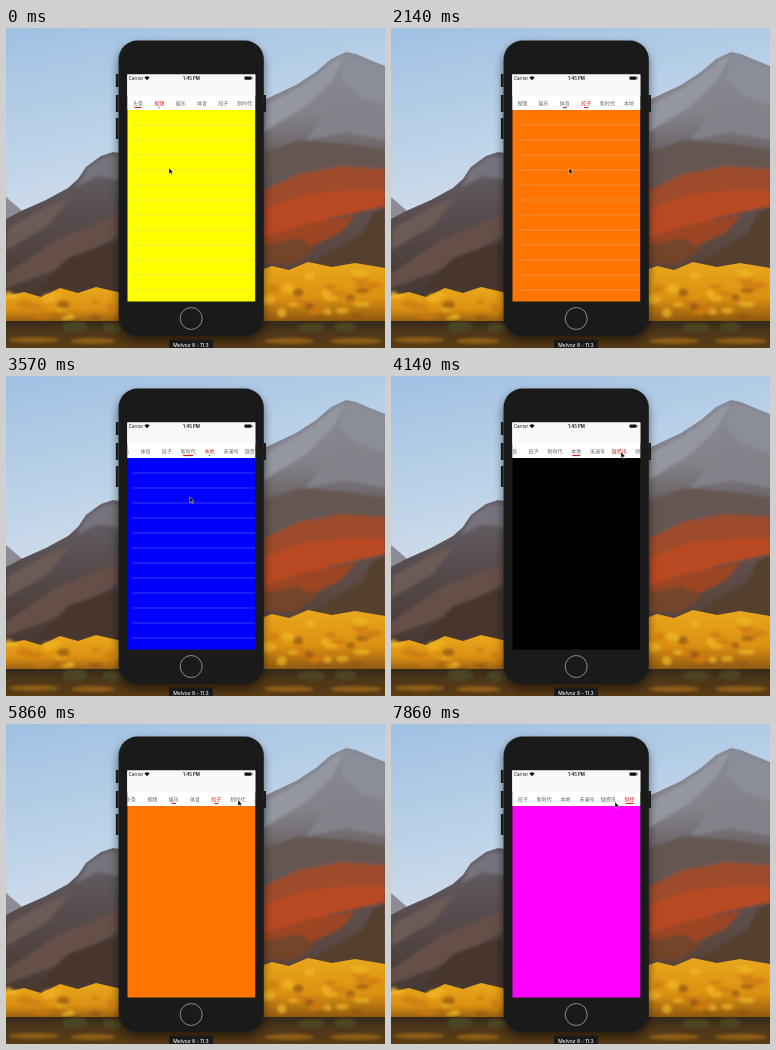
An HTML page for the animation above (8 s loop, 379x320 px).

```html
<!DOCTYPE html>
<html lang="zh">
<head>
<meta charset="utf-8">
<title>Tab pager</title>
<style>
html, body { margin: 0; width: 100%; height: 100%; overflow: hidden; background: #b9d0e4; }
svg { display: block; width: 100vw; height: 100vh; }
text { font-family: Inter, "Noto Sans CJK SC", "Noto Sans CJK", sans-serif; text-anchor: middle; }
#tabs text { font-family: "Noto Sans CJK SC", "Noto Sans CJK", sans-serif; font-size: 5px; }
</style>
</head>
<body>
<svg viewBox="0 0 379 320" preserveAspectRatio="none">
  <defs>
    <linearGradient id="sky" x1="0" y1="0" x2=".35" y2="1">
      <stop offset="0" stop-color="#9fc1e3"/><stop offset=".6" stop-color="#c2d5e9"/><stop offset="1" stop-color="#dce2ea"/>
    </linearGradient>
    <linearGradient id="rock" x1="0" y1="0" x2="0" y2="1">
      <stop offset="0" stop-color="#868a94"/><stop offset=".25" stop-color="#83828a"/>
      <stop offset=".45" stop-color="#645a5b"/><stop offset="1" stop-color="#553c33"/>
    </linearGradient>
    <linearGradient id="ridge" x1="0" y1="0" x2="0" y2="1">
      <stop offset="0" stop-color="#67626c"/><stop offset=".4" stop-color="#584e50"/><stop offset="1" stop-color="#46372f"/>
    </linearGradient>
    <linearGradient id="leaves" x1="0" y1="0" x2="0" y2="1">
      <stop offset="0" stop-color="#e9a81c"/><stop offset=".55" stop-color="#dc9012"/><stop offset="1" stop-color="#7c4b12"/>
    </linearGradient>
    <linearGradient id="water" x1="0" y1="0" x2="0" y2="1">
      <stop offset="0" stop-color="#33291a"/><stop offset=".4" stop-color="#4d3618"/><stop offset="1" stop-color="#5a3c15"/>
    </linearGradient>
    <filter id="soft"><feGaussianBlur stdDeviation="1.5"/></filter>
    <filter id="shade" x="-20%" y="-20%" width="140%" height="140%"><feGaussianBlur stdDeviation="5"/></filter>
    <clipPath id="screen"><rect x="121.3" y="46.5" width="128" height="227"/></clipPath>
  </defs>

  <g id="wallpaper">
    <rect width="379" height="220" fill="url(#sky)"/>
    <path d="M0 169L14 181L30 200H0Z" fill="#8d8c96"/>
    <path d="M0 191L15 183L40 172L62 160L72 151L80 139L95 128L107 124L120 126V275H0Z" fill="url(#ridge)"/>
    <path d="M240 80L260 71L290 57L310 44L325 31L340 24L350 26L364 32L379 38V270H240Z" fill="url(#rock)"/>
    <g filter="url(#soft)">
      <path d="M82 140L97 130L114 128V152L92 148L70 159Z" fill="#77737d"/>
      <path d="M2 200L42 178L64 170L42 198L0 222Z" fill="#6c5a54"/>
      <path d="M0 246L50 212L112 186V206L60 238L0 260Z" fill="#66504a"/>
      <path d="M62 230L112 212V262H30Z" fill="#46352f"/>
      <path d="M260 77L292 60L314 45L328 33L340 27L326 53L300 78L258 104Z" fill="#9496a0"/>
      <path d="M342 27L379 40V76L352 68L334 50Z" fill="#8b8e98"/>
      <path d="M330 70L352 72L379 84V112L340 104L300 112Z" fill="#83828a"/>
      <path d="M258 124L294 112L341 116L379 122V140L317 138L258 153Z" fill="#655751"/>
      <path d="M258 162L292 146L335 138L379 141V176L325 180L258 205Z" fill="#9d4c2c"/>
      <path d="M258 182L300 166L350 162L379 163V178L325 190L276 208L258 209Z" fill="#b94a22"/>
      <path d="M258 209L300 196L350 187L334 205L287 227L258 236Z" fill="#9c4522"/>
      <path d="M379 179L366 186L357 205L333 219L301 239H379Z" fill="#54402f"/>
      <path d="M258 217L291 210L311 220L290 236H258Z" fill="#74442a"/>
    </g>
    <path d="M0 268L18 264L35 269L54 260L72 265L90 259L120 266V299H0Z" fill="url(#leaves)"/>
    <path d="M250 244L266 238L283 242L302 234L326 239L349 235L379 240V299H250Z" fill="url(#leaves)"/>
    <g id="clumps" filter="url(#soft)"></g>
    <rect y="293" width="379" height="27" fill="url(#water)"/>
    <g filter="url(#soft)" fill="#8f5f18">
      <ellipse cx="28" cy="312" rx="25" ry="3"/><ellipse cx="87" cy="313" rx="22" ry="3"/>
      <ellipse cx="283" cy="313" rx="25" ry="3"/><ellipse cx="350" cy="313" rx="26" ry="3"/>
    </g>
    <g filter="url(#soft)" fill="#4c4420">
      <ellipse cx="69" cy="299" rx="13" ry="6"/><ellipse cx="106" cy="300" rx="10" ry="5"/>
      <ellipse cx="305" cy="300" rx="14" ry="5"/><ellipse cx="339" cy="299" rx="11" ry="5"/>
    </g>
  </g>

  <rect x="112" y="17" width="146" height="296" rx="20" opacity=".5" filter="url(#shade)"/>
  <path d="M111.2 46V59M111.2 67V84M111.2 90V111M258.7 67V84" stroke="#1a1a1b" stroke-width="2.6"/>
  <rect x="112.6" y="12.5" width="145.2" height="295.5" rx="19" fill="#1a1a1a"/>
  <circle cx="185.2" cy="290.5" r="11" fill="none" stroke="#8c8c8c" stroke-width="1"/>

  <g clip-path="url(#screen)">
    <g id="pages"></g>
    <rect x="121" y="46" width="129" height="36" fill="#fff"/>
    <rect x="121" y="46" width="129" height="22" fill="#f9f9f9"/>
    <g font-size="4.4" fill="#111">
      <text x="122.8" y="51.8" style="text-anchor:start">Carrier</text>
      <text x="185.5" y="51.8" font-weight="600">1:45 PM</text>
    </g>
    <path d="M138.4 49.5Q141 47.2 143.6 49.5L141 52.2Z" fill="#111"/>
    <rect x="238.5" y="48.5" width="7" height="3.2" rx=".8" fill="#111"/>
    <rect x="245.9" y="49.4" width=".7" height="1.4" fill="#111"/>
    <g id="tabs"></g>
  </g>

  <rect x="163" y="311.5" width="44" height="9" rx="1.5" fill="#1a1a1a"/>
  <text x="185" y="318.7" font-size="5" font-weight="500" fill="#f4f4f4">Melvoz 8 - 11.3</text>
  <path id="cursor" d="M0 0V6L1.4 4.8L2.3 6.8L3.3 6.3L2.4 4.4L4.2 4.3Z" fill="#000" stroke="#fff" stroke-width=".45"/>
</svg>
<script>
const LEFT = 121.3, WIDTH = 128, TAB = WIDTH / 6, FPS = 7, FRAMES = 56;
const RED = '#c62a20';
const labels = ['头条', '视频', '娱乐', '体育', '段子', '新时代', '本地', '禾澜号', '微资讯', '财经'];
const colors = ['#f00', '#ff0', '#0f0', '#800080', '#ff7500', '#7b7b7b', '#00f', '#0ff', '#000', '#f0f'];

// [step, tab, tapped]
const picks = [
  [-9, 0], [-.44, 1], [5, 2], [10, 3], [13.9, 4], [18.5, 5], [24.5, 6],
  [29, 8, 1], [32.5, 4, 1], [36.5, 2, 1], [40.37, 4, 1], [43.5, 6, 1], [47, 8, 1], [51, 9, 1]
];
// [step, x, y]
const pointer = [
  [0, 163, 140], [2, 229, 139], [4, 165, 140], [6.5, 229, 138], [7.4, 229, 138], [9, 168, 140],
  [11, 229, 139], [13, 178, 140], [15, 178, 140], [16, 226, 138], [17.6, 168, 139], [20, 225, 134],
  [22, 225, 134], [24, 166, 138], [27.6, 230, 76], [29.4, 230, 76], [32, 133, 76], [33, 133, 76],
  [36, 143, 76], [37, 143, 76], [39.8, 217, 76], [40.4, 219, 76], [41, 232, 76], [47.4, 229, 76],
  [50.5, 238, 76], [51.5, 238, 76], [55, 224, 78]
];

const byId = id => document.getElementById(id);
function add(parent, tag, attrs) {
  const el = document.createElementNS('http://www.w3.org/2000/svg', tag);
  for (const name in attrs) el.setAttribute(name, attrs[name]);
  return parent.appendChild(el);
}
const clamp = (v, lo, hi) => Math.min(hi, Math.max(lo, v));
const smooth = v => { v = clamp(v, 0, 1); return v * v * (3 - 2 * v); };
const mix = (a, b, p) => a + (b - a) * p;
const shift = i => clamp((i + .5) * TAB - WIDTH / 2, 0, labels.length * TAB - WIDTH);

let seed = 11;
const random = () => (seed = seed * 16807 % 2147483647) / 2147483647;
for (let i = 0; i < 44; i++) {
  const left = i % 3 === 0, depth = random();
  add(byId('clumps'), 'ellipse', {
    cx: left ? random() * 112 : 258 + random() * 121,
    cy: left ? 267 + depth * 23 : 243 + depth * 46,
    rx: 4 + random() * 5, ry: 2 + random() * 3,
    fill: ['#f0b824', '#cf7a13', '#8f5715'][i % 5 % 3], opacity: .7
  });
}

const pages = colors.map(fill => {
  const page = add(byId('pages'), 'g', {});
  add(page, 'rect', { x: LEFT, y: 82, width: WIDTH + .3, height: 192, fill });
  let d = '';
  for (let i = 1; i < 13; i++) d += `M${LEFT + 5.2} ${82 + i * 15}H${LEFT + WIDTH}`;
  const lines = add(page, 'path', { d, stroke: '#c8c7cc', 'stroke-width': .6, opacity: .5 });
  return { page, lines };
});

const tabs = labels.map((label, i) => {
  const x = LEFT + (i + .5) * TAB;
  const text = add(byId('tabs'), 'text', { x, y: 76.8 });
  text.textContent = label;
  const bar = add(byId('tabs'), 'rect', { y: 78.9, height: 1.2, fill: RED });
  return { text, bar, x, full: label.length * 4 };
});

function draw(step) {
  const at = picks.findLastIndex(pick => step >= pick[0]);
  const [start, tab, tapped] = picks[at];
  const from = at ? picks[at - 1][1] : 0;
  const next = picks[at + 1];
  const p = smooth((step - start) / 2.1);
  const barShare = tapped ? Math.sqrt(p) : p;

  const swipe = next && !next[2] ? smooth((step - next[0] + 2.6) / 2.5) : 0;
  const position = tab + swipe;
  pages.forEach(({ page, lines }, i) => {
    const dx = (i - position) * WIDTH;
    page.setAttribute('transform', `translate(${dx})`);
    page.style.display = Math.abs(dx) < WIDTH ? '' : 'none';
    lines.style.display = tapped ? 'none' : '';
  });

  byId('tabs').setAttribute('transform', `translate(${-mix(shift(from), shift(tab), p)})`);
  tabs.forEach(({ text, bar, x, full }, i) => {
    const width = full * (i === tab ? barShare : i === from ? 1 - barShare : 0);
    text.setAttribute('fill', i === tab ? RED : '#666');
    text.setAttribute('font-weight', i === tab ? 500 : 400);
    bar.setAttribute('x', x - width / 2);
    bar.setAttribute('width', width);
  });

  const k = pointer.findIndex(key => key[0] > step);
  const b = pointer.at(k), a = k > 0 ? pointer[k - 1] : b;
  const q = a === b ? 0 : (step - a[0]) / (b[0] - a[0]);
  byId('cursor').setAttribute('transform', `translate(${mix(a[1], b[1], q)} ${mix(a[2], b[2], q)})`);
}

function tick(now) {
  draw(Math.floor((now + 4.5) * FPS / 1000) % FRAMES);
  requestAnimationFrame(tick);
}
draw(0);
requestAnimationFrame(tick);
</script>
</body>
</html>
```
